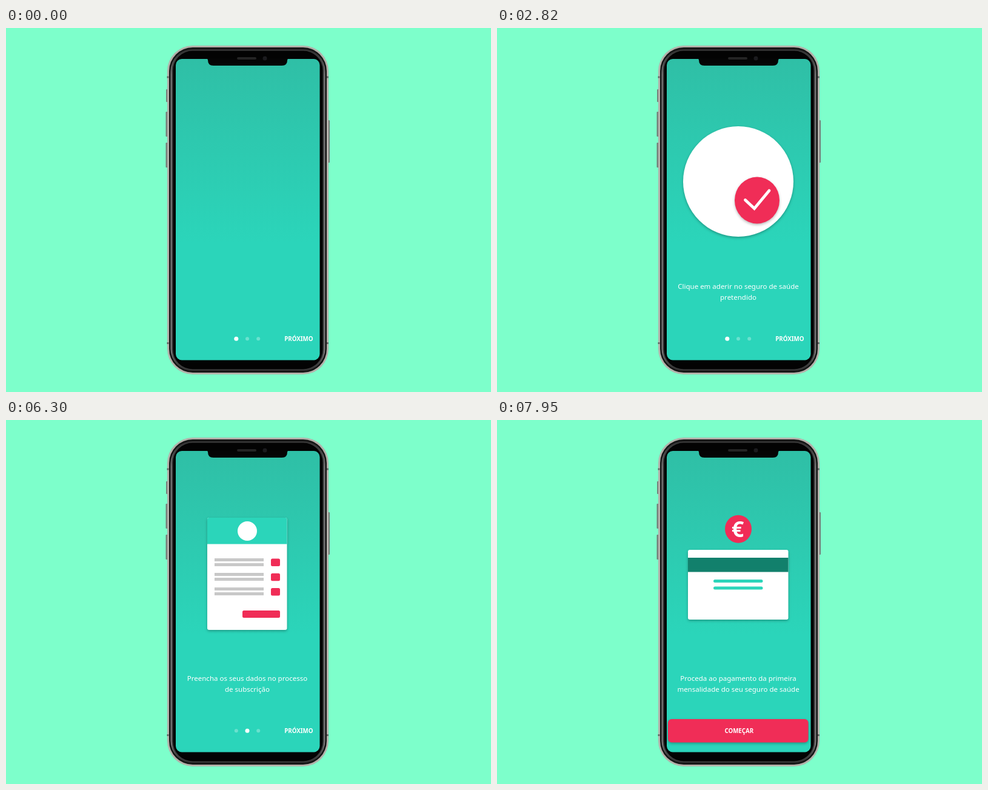
Animation, 800 px wide and 600 px high, one loop 8000 ms. Source, as an HTML page:

```html
<!DOCTYPE html>
<html lang="pt">
<head>
<meta charset="utf-8">
<title>Introdução</title>
<style>
  html, body { margin: 0; width: 100%; height: 100%; overflow: hidden; background: #7dffcb; }
  svg { display: block; width: 100vw; height: 100vh; font-family: "Noto Sans", sans-serif; }
  .caption { font-size: 11.5px; fill: #fff; text-anchor: middle; }
  .label { font-size: 9.75px; font-weight: 700; fill: #fff; }
  .raised { filter: drop-shadow(0 2px 2px rgba(0, 0, 0, .28)); }
  .red { fill: #f02d57; }
  .teal { fill: #2bd5ba; }
</style>
</head>
<body>
<svg viewBox="0 0 800 600">
  <defs>
    <linearGradient id="sky" gradientUnits="userSpaceOnUse" x1="0" y1="50" x2="0" y2="355">
      <stop offset="0" stop-color="#2fbfa6"/><stop offset="1" stop-color="#2bd5ba"/>
    </linearGradient>
    <linearGradient id="steel" x2="0" y2="1">
      <stop offset="0" stop-color="#262626"/><stop offset=".08" stop-color="#7c7c7c"/>
      <stop offset=".94" stop-color="#7c7c7c"/><stop offset="1" stop-color="#262626"/>
    </linearGradient>
    <clipPath id="screen"><rect x="280" y="51" width="237.5" height="496.5" rx="10"/></clipPath>
  </defs>

  <!-- phone -->
  <g fill="#77807b">
    <rect x="264" y="101" width="4" height="21" rx="1"/>
    <rect x="263.5" y="138" width="4" height="41" rx="1"/>
    <rect x="263.5" y="189" width="4" height="41" rx="1"/>
    <rect x="530" y="152" width="4" height="70" rx="1"/>
  </g>
  <rect x="266" y="29" width="266" height="542" rx="42" fill="#b3b1aa"/>
  <path d="M265.5 81h3M265.5 519.5h3M529 81h3M529 519.5h3" stroke="#666" stroke-width="3"/>
  <rect x="269" y="32" width="260" height="536" rx="39" fill="#141414"/>
  <rect x="271.5" y="34.5" width="255" height="531" rx="36.5" fill="url(#steel)"/>
  <rect x="273.500" y="36" width="251" height="528" rx="34.500" fill="#3c3c3c"/>
  <rect x="275.500" y="37.500" width="247" height="525" rx="32.500" fill="#030303"/>

  <g clip-path="url(#screen)">
    <rect x="278" y="50" width="242" height="498" fill="url(#sky)"/>

    <g id="page1">
      <circle id="emblem" class="raised" cx="398" cy="253" r="91" fill="#fff"/>
      <g id="badge">
        <ellipse class="red raised" cx="429" cy="284" rx="37" ry="38.5"/>
        <path d="M409.5 283.5L424.5 297.5L449 268" fill="none" stroke="#fff" stroke-width="4.8" stroke-linecap="round"/>
      </g>
      <text class="caption" x="398" y="429.5">Clique em aderir no seguro de saúde<tspan x="398" dy="18">pretendido</tspan></text>
    </g>

    <g id="page2">
      <g class="raised">
        <rect x="332" y="161" width="131.5" height="185" rx="3" fill="#fff"/>
        <path class="teal" d="M332 204.5V164a3 3 0 0 1 3-3h125.5a3 3 0 0 1 3 3v40.5z"/>
      </g>
      <circle cx="398" cy="183" r="16" fill="#fff"/>
      <g class="red">
        <rect x="437" y="228.5" width="15" height="12.5" rx="2.5"/>
        <rect x="437" y="252.8" width="15" height="12.5" rx="2.5"/>
        <rect x="437" y="277" width="15" height="12.5" rx="2.5"/>
        <rect id="submit" x="390" y="314" width="62" height="12" rx="2.5"/>
      </g>
      <path id="lines" fill="#c8c8c8"/>
      <text class="caption" x="398" y="429.5">Preencha os seus dados no processo<tspan x="398" dy="18">de subscrição</tspan></text>
    </g>

    <g id="page3">
      <g id="coin">
        <ellipse class="red" cx="398" cy="180.3" rx="22" ry="23"/>
        <text x="397" y="193.5" font-size="36" font-weight="700" fill="#fff" text-anchor="middle">€</text>
      </g>
      <rect class="raised" x="315" y="214" width="165.5" height="115" rx="3" fill="#fff"/>
      <rect x="315" y="227" width="165.5" height="23.5" fill="#12806c"/>
      <rect class="teal" x="357" y="263" width="81.5" height="5" rx="2.5"/>
      <rect class="teal" x="357" y="274.5" width="81.5" height="5" rx="2.5"/>
      <text id="caption3" class="caption" x="398" y="429.5">Proceda ao pagamento da primeira<tspan x="398" dy="18">mensalidade do seu seguro de saúde</tspan></text>
    </g>

    <g id="nav" fill="#fff">
      <circle id="dot1" cx="379.8" cy="512.3"/>
      <circle id="dot2" cx="398" cy="512.3"/>
      <circle cx="416.2" cy="512.3" r="3" opacity=".3"/>
      <text class="label" x="506.5" y="516" text-anchor="end">PRÓXIMO</text>
    </g>

    <g id="start">
      <rect class="red raised" x="282" y="493" width="231.5" height="38.5" rx="6"/>
      <text class="label" x="399.3" y="516" text-anchor="middle">COMEÇAR</text>
    </g>
  </g>

  <!-- notch -->
  <path d="M328 50h141q-5 0-5 3q0 9-9 9H342q-9 0-9-9q0-3-5-3z" fill="#050505"/>
  <rect x="381" y="48" width="32" height="4" rx="2" fill="#242424"/>
  <circle cx="427" cy="50" r="3.5" fill="#1b1b1e"/>
</svg>
<script>
const LOOP = 8000, PAGE_WIDTH = 241;
const parts = {};
document.querySelectorAll("svg [id]").forEach(el => parts[el.id] = el);

const ramp = (t, from, to) => Math.min(1, Math.max(0, (t - from) / (to - from)));
const smooth = p => p * p * (3 - 2 * p);
const swipe = p => p < .5 ? 8 * p ** 4 : 1 - 8 * (1 - p) ** 4;
const fade = (name, value) => {
  parts[name].setAttribute("opacity", value);
  parts[name].style.visibility = value > 0 ? "visible" : "hidden";
};
const move = (name, x, y) => parts[name].setAttribute("transform", `translate(${x} ${y})`);

function setDot(name, active) {
  parts[name].setAttribute("r", 3 + .5 * active);
  parts[name].setAttribute("opacity", .3 + .7 * active);
}

// Six form lines, two per row, each opening as a wedge from the left.
function formLines(t) {
  let d = "";
  for (let i = 0; i < 6; i++) {
    const p = ramp(t, 4560 + 60 * i, 4620 + 60 * i);
    if (!p) break;
    const y = 228 + 24 * (i >> 1) + 8 * (i % 2);
    d += `M344 ${y}h${81 * p}v${5 * Math.max(.15, 2 * p - 1)}L344 ${y + 5}z`;
  }
  return d;
}

function draw(t) {
  const firstSwipe = swipe(ramp(t, 2790, 3420));
  const secondSwipe = swipe(ramp(t, 6270, 6900));

  fade("page1", firstSwipe < 1 ? ramp(t, 0, 390) : 0);
  move("page1", -PAGE_WIDTH * firstSwipe, 0);
  fade("emblem", .33 + .67 * ramp(t, 840, 1020));
  fade("badge", ramp(t, 1140, 1290));

  fade("page2", secondSwipe < 1 ? ramp(t, 3575, 3840) : 0);
  move("page2", -PAGE_WIDTH * secondSwipe, 0);
  parts.lines.setAttribute("d", formLines(t));
  fade("submit", ramp(t, 5070, 5190));

  const entry = ramp(t, 7080, 7400);
  fade("page3", entry);
  move("caption3", 0, 14 * (1 - smooth(entry)));
  move("coin", 0, -12.5 * Math.sin(Math.PI * ramp(t, 7400, 7960)));

  const second = ramp(t, 3000, 3200);
  setDot("dot1", 1 - second);
  setDot("dot2", second);
  fade("nav", 1 - ramp(t, 6300, 6600));

  const rise = smooth(ramp(t, 6360, 7080));
  fade("start", rise);
  move("start", 0, 36 * (1 - rise));
}

function tick() {
  draw(performance.now() % LOOP);
  requestAnimationFrame(tick);
}
tick();
</script>
</body>
</html>
```
